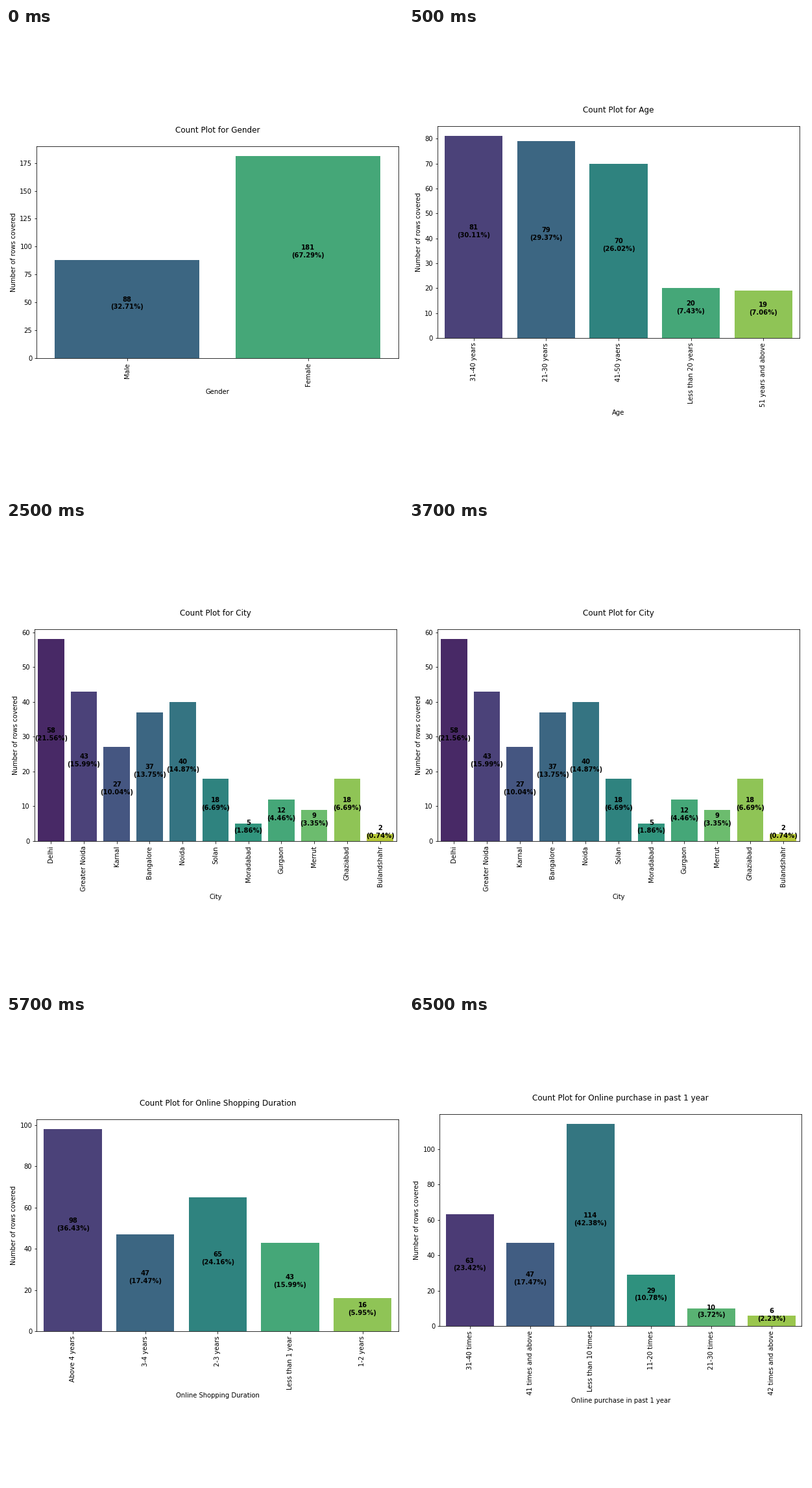
Recreate the animation shown at these times as a matplotlib script. Size 612 by 717 pixels, loop 8 s.

```python
import colorsys

import matplotlib.pyplot as plt
import numpy as np
from matplotlib.animation import FuncAnimation

WIDTH, HEIGHT, DPI = 612, 717, 72
AXES_W, AXES_H = 558, 326.16
INTERVAL = 500

plt.rcParams.update({"font.family": "DejaVu Sans", "font.size": 10})

# title, (left, bottom) of the axes in pixels from the top left, counts
CHARTS = [
    ("Gender", (47.3, 508), {"Male": 88, "Female": 181}),
    ("Age", (43.95, 477), {
        "31-40 years": 81, "21-30 years": 79, "41-50 yaers": 70,
        "Less than 20 years": 20, "51 years and above": 19}),
    ("City", (43.95, 491), {
        "Delhi": 58, "Greater Noida": 43, "Karnal": 27, "Bangalore": 37,
        "Noida": 40, "Solan": 18, "Moradabad": 5, "Gurgaon": 12,
        "Merrut": 9, "Ghaziabad": 18, "Bulandshahr": 2}),
    ("Online Shopping Duration", (47.3, 485), {
        "Above 4 years": 98, "3-4 years": 47, "2-3 years": 65,
        "Less than 1 year": 43, "1-2 years": 16}),
    ("Online purchase in past 1 year", (47.3, 477), {
        "31-40 times": 63, "41 times and above": 47,
        "Less than 10 times": 114, "11-20 times": 29,
        "21-30 times": 10, "42 times and above": 6}),
]
# Number of animation steps each chart stays on screen
HOLDS = [1, 4, 4, 4, 3]
SCHEDULE = np.repeat(np.arange(len(CHARTS)), HOLDS)


def muted_viridis(n, saturation=0.75):
    colors = []
    for value in np.linspace(0, 1, n + 2)[1:-1]:
        h, l, s = colorsys.rgb_to_hls(*plt.cm.viridis(value)[:3])
        colors.append(colorsys.hls_to_rgb(h, l, s * saturation))
    return colors


fig = plt.figure(figsize=(WIDTH / DPI, HEIGHT / DPI), dpi=DPI, facecolor="white")


def draw_chart(name, corner, counts):
    left, bottom = corner
    ax = fig.add_axes([left / WIDTH, 1 - bottom / HEIGHT,
                       AXES_W / WIDTH, AXES_H / HEIGHT])
    n = len(counts)
    values = list(counts.values())
    total = sum(values)
    ax.bar(range(n), values, width=0.8, color=muted_viridis(n), linewidth=0)
    for x, value in enumerate(values):
        ax.text(x, value / 2, f"{value}\n({value / total:.2%})",
                ha="center", weight="bold")
    ax.set_xlim(-0.5, n - 0.5)
    ax.set_ylim(0, max(values) * 1.05)
    ax.set_xticks(range(n), list(counts), rotation=90)
    ax.set_xlabel(name)
    ax.set_ylabel("Number of rows covered")
    ax.set_title(f"Count Plot for {name}\n", fontsize=12)
    return ax


axes = [draw_chart(*chart) for chart in CHARTS]


def update(step):
    for i, ax in enumerate(axes):
        ax.set_visible(i == SCHEDULE[step])
    return axes


anim = FuncAnimation(fig, update, frames=len(SCHEDULE), interval=INTERVAL,
                     repeat=True, repeat_delay=0, blit=False)
plt.show()
```
